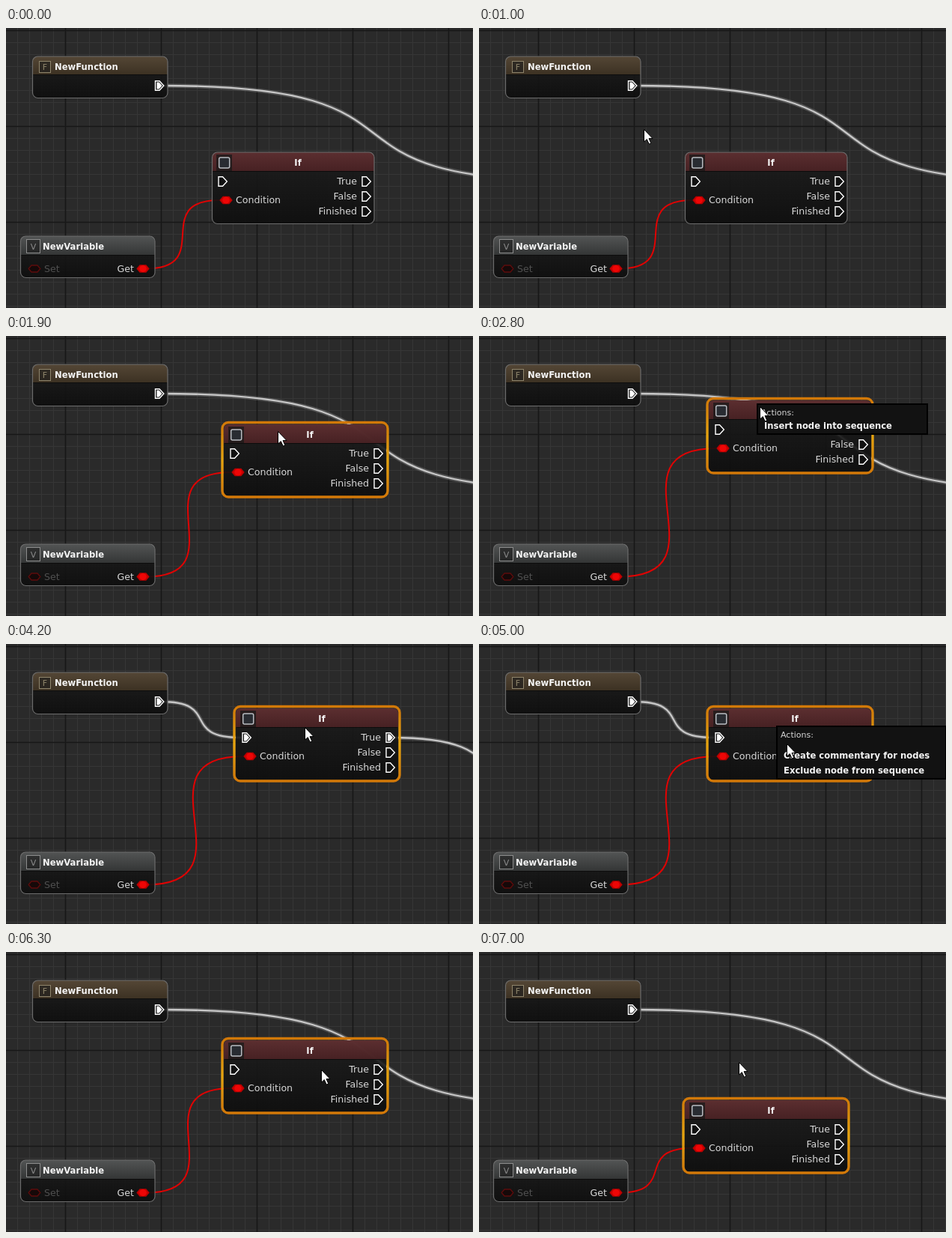
An HTML page for the animation above (7100 ms loop, 624 px wide and 374 px high).

```html
<!DOCTYPE html>
<html lang="en">
<head>
<meta charset="utf-8">
<title>Node graph</title>
<style>
  html, body { margin: 0; width: 624px; height: 374px; overflow: hidden; background: #2a2a2a; }
  svg { display: block; }
  text { font: 12.6px "DejaVu Sans", Verdana, sans-serif; fill: #d8d8d8; }
  .bold { font-weight: bold; font-size: 11.6px; fill: #f4f4f4; }
  .small { font-size: 11px; }
  .icon { font-size: 11px; text-anchor: middle; }
  .end { text-anchor: end; }
  .mid { text-anchor: middle; }
  .wire { fill: none; stroke-linecap: round; }
</style>
</head>
<body>
<svg id="stage" width="624" height="374" viewBox="0 0 624 374">
  <defs>
    <linearGradient id="brown" x2="0" y2="1"><stop stop-color="#5a4b38"/><stop offset="1" stop-color="#403424"/></linearGradient>
    <linearGradient id="gray" x2="0" y2="1"><stop stop-color="#585a5a"/><stop offset="1" stop-color="#373939"/></linearGradient>
    <linearGradient id="red" x2="0" y2="1"><stop stop-color="#623032"/><stop offset="1" stop-color="#4c2224"/></linearGradient>
    <linearGradient id="body" x2="0" y2="1"><stop stop-color="#1d1d1d"/><stop offset="1" stop-color="#0d0d0d"/></linearGradient>
    <linearGradient id="glow" x2="0" y2="1"><stop stop-color="#d27808"/><stop offset=".5" stop-color="#e6a40e"/><stop offset="1" stop-color="#d27808"/></linearGradient>
    <linearGradient id="hot" x2="0" y2="1"><stop stop-color="#a85a10"/><stop offset=".5" stop-color="#e4720c"/><stop offset="1" stop-color="#fb8008"/></linearGradient>
  </defs>
</svg>
<script>
const LOOP = 7100, STEP = 100, GRID = 16;
const stage = document.getElementById('stage');

// Pointer path: time, x, y
const path = [
  [100, 596, 346], [300, 420, 300], [500, 200, 190], [700, 60, 70], [800, 44, 40],
  [900, 110, 80], [1100, 330, 190], [1200, 380, 214], [1300, 351, 180], [1500, 351, 176],
  [1600, 351, 165], [1800, 357, 142], [2000, 369, 112], [2200, 376, 99], [2400, 375, 94],
  [2800, 375, 94], [2900, 398, 114], [3000, 402, 118], [3100, 402, 118], [3300, 290, 112],
  [3400, 216, 96], [3600, 390, 150], [3800, 590, 136], [4000, 470, 122], [4200, 399, 111],
  [4300, 400, 112], [4600, 404, 120], [4800, 404, 120], [5200, 418, 146], [5500, 431, 165],
  [5600, 431, 167], [5900, 437, 127], [6000, 437, 125], [6300, 421, 157], [6400, 414, 191],
  [6500, 407, 220], [6600, 403, 235], [6700, 396, 222], [7000, 347, 147]
];
const drags = [
  { from: 1400, to: 2400, x: 351, y: 180 },
  { from: 6000, to: 6600, x: 437, y: 125 }
];

function add(parent, tag, attrs, text) {
  const el = document.createElementNS('http://www.w3.org/2000/svg', tag);
  for (const k in attrs) el.setAttribute(k, attrs[k]);
  if (text) el.textContent = text;
  return parent.appendChild(el);
}
const group = (parent, x = 0, y = 0) => add(parent, 'g', { transform: `translate(${x} ${y})` });
const label = (parent, x, y, text, cls = '') => add(parent, 'text', { x, y, class: cls }, text);
const show = (el, on) => el.setAttribute('visibility', on ? 'visible' : 'hidden');

function gridLines(gap, color, width) {
  let d = '';
  for (let x = 79 % gap + .5; x < 624; x += gap) d += `M${x} 0V374`;
  for (let y = 3 % gap + .5; y < 374; y += gap) d += `M0 ${y}H624`;
  add(stage, 'path', { d, stroke: color, 'stroke-width': width });
}

function panel(x, y, w, h, head, fill) {
  const g = group(stage, x, y);
  add(g, 'rect', { width: w, height: h, rx: 7, fill: 'url(#body)', 'fill-opacity': .9 });
  add(g, 'path', {
    d: `M0 ${head}V7Q0 0 7 0H${w - 7}Q${w} 0 ${w} 7V${head}z`,
    fill: `url(#${fill})`, 'fill-opacity': .9
  });
  add(g, 'path', { d: `M1 ${head + .5}H${w - 1}`, stroke: '#0c0c0c' });
  const edge = add(g, 'rect', { x: .5, y: 0, width: w - .5, height: h - .5, rx: 7, fill: 'none', stroke: '#6c6c6c', 'stroke-width': 1.2 });
  return { g, edge };
}

// Sequence pin; returns the part shown when connected
function execPin(parent, x, y) {
  const g = group(parent, x, y);
  add(g, 'path', { d: 'M.5 .7H6L11.8 7 6 13.3H.5z', fill: '#111', stroke: '#fff', 'stroke-width': 1.4 });
  return add(g, 'path', { d: 'M2.5 2.5H5.5L9.5 7 5.5 11.5H2.5z', fill: '#fff' });
}

function dataPin(parent, x, y, used) {
  const g = group(parent, x, y);
  add(g, 'path', {
    d: 'M.2 5.5L4 1H12L15.8 5.5 12 10H4z', fill: used ? '#d00000' : '#160909',
    stroke: used ? '#b80000' : '#5d0c0c', 'stroke-width': 1.4, 'stroke-linejoin': 'round'
  });
  if (used) add(g, 'circle', { cx: 8, cy: 5.5, r: 4.6, fill: '#ee0606' });
}

function iconBox(parent, x, y, size, char, color) {
  add(parent, 'rect', { x, y, width: size, height: size, fill: '#1c1c1c', 'fill-opacity': .6, stroke: color });
  label(parent, x + size / 2, y + size / 2 + 4, char, 'icon').style.fill = color;
}

function wire(color, width, halo) {
  const lines = [];
  if (halo) lines.push(add(stage, 'path', { class: 'wire', stroke: color, 'stroke-width': 5.5, 'stroke-opacity': .25 }));
  lines.push(add(stage, 'path', { class: 'wire', stroke: color, 'stroke-width': width }));
  return lines;
}

function route(lines, x1, y1, x2, y2) {
  const bend = .69 * Math.hypot(x2 - x1, y2 - y1);
  const d = `M${x1} ${y1}C${x1 + bend} ${y1} ${x2 - bend} ${y2} ${x2} ${y2}`;
  lines.forEach(l => l.setAttribute('d', d));
}

function menu(x, y, w, h, items) {
  const g = group(stage, x, y);
  add(g, 'rect', { x: 1, y: 1, width: w - 2, height: h - 2, fill: '#121212', stroke: '#000', 'stroke-width': 2 });
  label(g, 6, 16, 'Actions:', 'small');
  const rows = items.map(([text, mid]) => {
    const bar = add(g, 'rect', { x: 3, y: mid - 9, width: w - 6, height: 19, fill: 'url(#hot)' });
    return { bar, top: y + mid - 9, text: label(g, 10, mid + 4, text, 'bold') };
  });
  return { g, rows };
}

function drawMenu(m, open, y) {
  show(m.g, open);
  m.rows.forEach(({ bar, top, text }) => {
    const hot = open && y >= top && y < top + 19;
    show(bar, hot);
    text.style.fill = hot ? '#2a1200' : '#f4f4f4';
  });
}

gridLines(16, '#363636', 1);
gridLines(128, '#171717', 1.5);

const outWire = wire('#c8c8c8', 2.3, true);
const inWire = wire('#c8c8c8', 2.3, true);
const redWire = wire('#e00303', 2);

const fn = panel(35, 38, 181, 56, 24, 'brown').g;
iconBox(fn, 9.5, 6.5, 15, 'F', '#8f856c');
label(fn, 30, 17.5, 'NewFunction', 'bold');
execPin(fn, 164, 32);

const variable = panel(19, 278, 180, 56, 25, 'gray').g;
iconBox(variable, 8.5, 4.5, 18, 'V', '#8c8c8c');
label(variable, 30, 18, 'NewVariable', 'bold');
dataPin(variable, 11, 38);
label(variable, 32, 48, 'Set').style.fill = '#505050';
label(variable, 152, 48, 'Get', 'end');
dataPin(variable, 156, 38, true);

const { g: branch, edge } = panel(275, 166, 217, 96, 25, 'red');
add(branch, 'rect', { x: 6, y: 3, width: 21, height: 22, fill: '#191919', 'fill-opacity': .75 });
add(branch, 'rect', { x: 9.7, y: 7, width: 14, height: 14, rx: 2, fill: '#292c32', stroke: '#b9bdc2', 'stroke-width': 1.5 });
label(branch, 115, 18, 'If', 'bold mid');
const inPin = execPin(branch, 8.5, 32);
dataPin(branch, 11, 58.5, true);
label(branch, 32, 68, 'Condition');
const outPins = ['True', 'False', 'Finished'].map((name, i) => {
  label(branch, 194, 43 + i * 20, name, 'end');
  return execPin(branch, 200.5, 32 + i * 20);
});
outPins.slice(1).forEach(p => show(p, false));
const ring = add(branch, 'rect', { x: -2, y: -2.5, width: 221, height: 99.5, rx: 8, fill: 'none', stroke: 'url(#glow)', 'stroke-width': 3.3 });

const insertMenu = menu(371, 90, 229, 42, [['Insert node into sequence', 30]]);
const nodeMenu = menu(397, 109, 228, 72, [['Create commentary for nodes', 40], ['Exclude node from sequence', 60]]);

const pointer = add(stage, 'path', {
  d: 'M.5 .5V17L4.3 13.6 7.2 20 9.8 18.8 7 12.6H12z',
  fill: '#fff', stroke: '#000', 'stroke-width': 1
});

function pointerAt(t) {
  let i = path.findIndex(p => p[0] > t);
  if (i < 0) return path[path.length - 1].slice(1);
  i = Math.max(i, 1);
  const [t0, x0, y0] = path[i - 1], [t1, x1, y1] = path[i];
  const k = Math.max(0, (t - t0) / (t1 - t0));
  return [x0 + (x1 - x0) * k, y0 + (y1 - y0) * k];
}

// Dragging snaps the node to the grid
function branchOffset(t) {
  let dx = 0, dy = 0;
  for (const d of drags) {
    if (t < d.from) continue;
    const [x, y] = pointerAt(Math.min(t, d.to));
    dx += Math.round((x - d.x) / GRID) * GRID;
    dy += Math.round((y - d.y) / GRID) * GRID;
  }
  return [dx, dy];
}

function draw(t) {
  const [px, py] = pointerAt(t), [dx, dy] = branchOffset(t);
  const linked = t >= 3000 && t < 5700, selected = t >= 1500;

  pointer.setAttribute('transform', `translate(${px} ${py})`);
  show(pointer, t >= 100);
  branch.setAttribute('transform', `translate(${275 + dx} ${166 + dy})`);
  show(ring, selected);
  show(edge, !selected);
  show(inPin, linked);
  show(outPins[0], linked);

  route(redWire, 187, 321.5, 285 + dx, 230 + dy);
  inWire.forEach(l => show(l, linked));
  route(inWire, 207, 77, 281 + dx, 205 + dy);
  if (linked) route(outWire, 482 + dx, 205 + dy, 777, 205);
  else route(outWire, 207, 77, 777, 205);

  drawMenu(insertMenu, t >= 2700 && t < 3000, py);
  drawMenu(nodeMenu, t >= 4300 && t < 5700, py);
}

const start = performance.now();
function tick() {
  const t = (performance.now() - start) % LOOP;
  draw(Math.floor(t / STEP) * STEP);
  requestAnimationFrame(tick);
}
tick();
</script>
</body>
</html>
```
